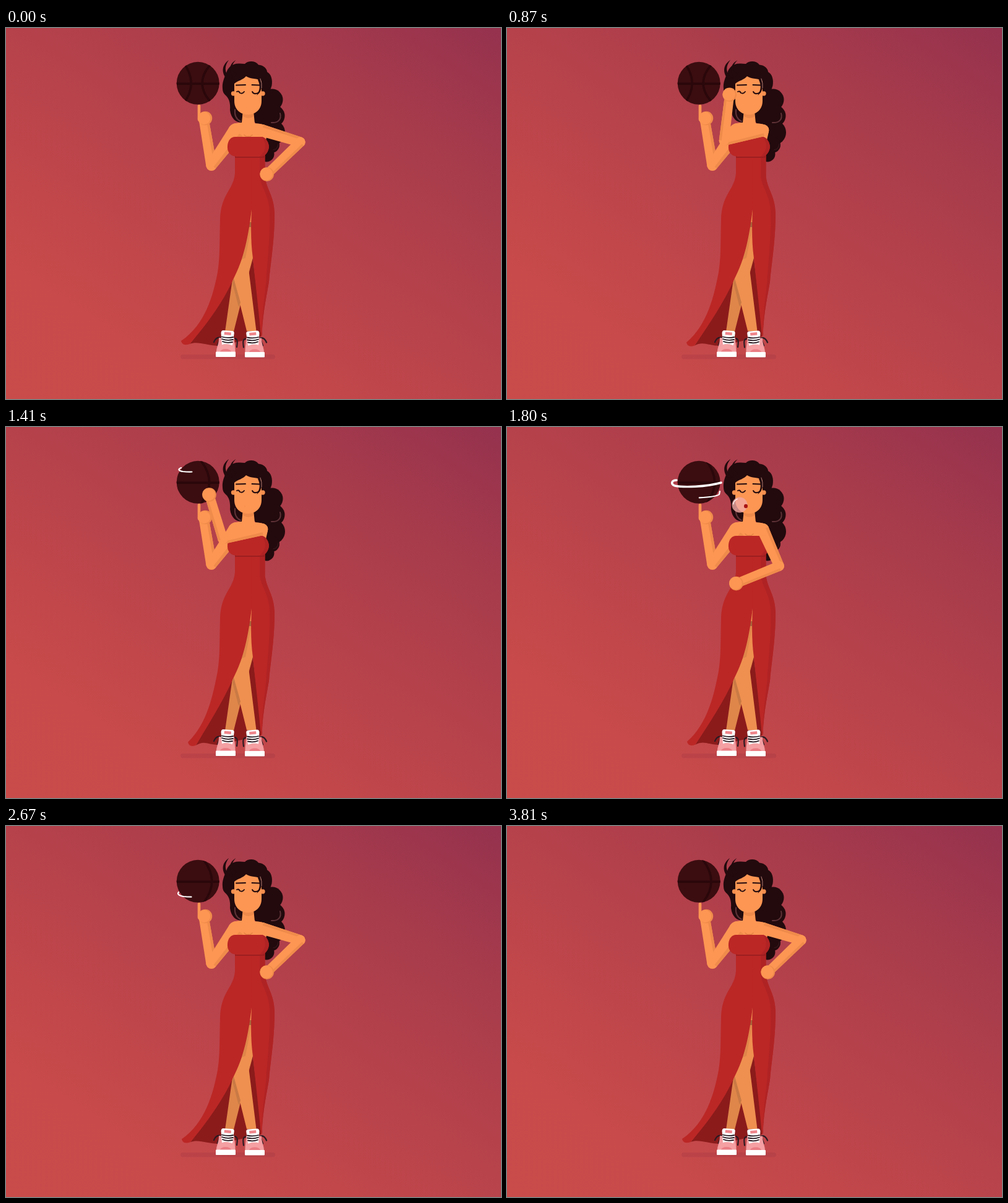
Recreate the animation shown at these times as an HTML page. Size 800 by 600 pixels, loop 3840 ms.

```html
<!DOCTYPE html>
<html lang="en">
<head>
<meta charset="utf-8">
<title>Ball spin</title>
<style>
html, body { margin: 0; width: 100%; height: 100%; overflow: hidden; background: #b8444b; }
svg { display: block; width: 100vw; height: 100vh; }
.line { fill: none; stroke-linecap: round; stroke-linejoin: round; }
</style>
</head>
<body>
<svg viewBox="0 0 800 600" preserveAspectRatio="xMidYMid slice">
  <defs>
    <linearGradient id="bg" gradientUnits="userSpaceOnUse" x1="0" y1="600" x2="516" y2="-179">
      <stop offset="0" stop-color="#c94b4a"/>
      <stop offset=".2" stop-color="#c84a4a"/>
      <stop offset=".5" stop-color="#b8434b"/>
      <stop offset=".76" stop-color="#a83c4b"/>
      <stop offset="1" stop-color="#96324e"/>
    </linearGradient>
    <clipPath id="ballClip"><circle r="34.5"/></clipPath>
    <g id="seams" class="line" stroke="#2a070a" stroke-width="3.600">
      <path d="M-24-34Q2 0-24 34M24-34Q-10 0 24 34"/>
    </g>
    <g id="shoe">
      <path class="line" d="M347 501C341 499 338 503 336 508M346 502L342 513M369 502C375 502 374 509 373 516" stroke="#2b1a22" stroke-width="2.200"/>
      <path d="M340 524C340 516 344 512 344 501H369C369 511 371 516 370.500 524Z" fill="#f39da1"/>
      <path d="M351 489L366 490Q369 490.500 368.700 494L366 513H349L347.500 493Q348 489 351 489Z" fill="#fff"/>
      <path d="M353 491.500L364 492.500 363.500 497 352.500 496Z" fill="#ee858b"/>
      <path class="line" d="M349 499.500Q358 502 367 500M349 503Q357 506 367 504M350 507Q357 510 366 508" stroke="#24161d" stroke-width="1.800"/>
      <path d="M341 524C341 516 346 511 356 511C365 511 370 516 370 524Z" fill="#f5a0a3"/>
      <path d="M346 524A9 5 0 0 1 364 524Z" fill="#ea7d84"/>
      <rect x="339" y="523.500" width="32" height="8.500" rx="1" fill="#fff"/>
    </g>
  </defs>

  <rect width="800" height="600" fill="url(#bg)"/>
  <rect x="282" y="528" width="153" height="7.500" rx="3.700" fill="#8c2f40" opacity=".2"/>

  <g fill="#220a0d">
    <path d="M350 98C349 88 353 80 356 73C358 64 366 56.500 378 57.500L386 58C391 52.500 403 52.500 408 59.500C416 60 422 66 422 71C429 75 431 84 429.500 93L426 104 420 152 384 153C372 154 364 147 362 133C363 120 360 113 354 108Q350 104 350 98Z"/>
    <circle cx="430" cy="116" r="17.500"/>
    <circle cx="433" cy="142" r="17.500"/>
    <circle cx="431" cy="169" r="20"/>
    <circle cx="429" cy="189" r="13"/>
    <circle cx="421" cy="204" r="12.500"/>
    <path d="M402 110H430V205H404Z"/>
  </g>
  <g class="line" stroke="#5e3237" stroke-width="2">
    <path d="M370 132C369 142 373 148 379 151"/>
    <path d="M443 138C446 148 439 154 429 153"/>
    <path d="M440 188Q439 196 432 197" stroke="#35161a" stroke-width="1.500"/>
  </g>

  <path d="M383 134L381 153C366 153 361 158 358 168L360 190H418L423 168C425 159 419 155 402 154L400 134Z" fill="#fd9653"/>
  <path d="M383 134H400V143Q391 149 382.500 142Z" fill="#ee8a4b"/>
  <path class="line" d="M385 173Q389 177 391.500 175Q394 177 398 173" stroke="#e58245" stroke-width="1.600"/>
  <g id="leftArm"></g>

  <path id="inside" fill="#8b1b1b"/>
  <path d="M397 293L388 350 366 406 354 491H368L379 447 399 372 396 320Z" fill="#df864a"/>
  <path d="M397 293L393 314H397ZM397 322L399 370 392.500 393 404.500 490H389L368 405 383 370 390 330Z" fill="#ef9050"/>
  <path d="M391 322H396.500L387 372 381 374Z" fill="#df864a"/>
  <path d="M368 405L379 444 376 451 366 413Z" fill="#c97a45"/>
  <path d="M392.500 314H397V322H391Z" fill="#a9653b"/>
  <path id="dress" fill="#bb2725"/>
  <path d="M397 293C396 315 395 345 399 372C403 410 408 455 412 497Q413 501 413.500 497C415 460 421 435 425 410C428 375 434 345 434 300C433 270 421 262 418.500 240V204H396Z" fill="#bb2725"/>
  <path d="M410 204H418.500V240C421 262 433 270 434 300C434 345 428 375 425 410C421 435 415 460 413.500 497C414 450 420 425 421 400C424 360 427 330 426 295C424 268 412 258 410 240Z" fill="#b02324"/>
  <path d="M370 206H418.500V210H370Z" fill="#9d1e20"/>
  <path d="M370 176H414C421 178 425 186 425 193C423 204 417 208 410 208H372C362 207 357 200 358 190C359 181 364 176 370 176Z" fill="#bb2725"/>
  <path d="M414 176C421 178 425 186 425 193C423 204 417 208 410 208C420 199 422 188 414 176Z" fill="#b02324"/>

  <use href="#shoe"/>
  <use href="#shoe" transform="matrix(-1 0 0 1 757 .5)"/>

  <circle cx="367.500" cy="106" r="3.700" fill="#f58e4e"/>
  <circle cx="415" cy="106" r="3.700" fill="#f58e4e"/>
  <path d="M369 90C375 85 383 84 388 78C395 83 407 81 413 86V118C413 132 403 140 391 140C379 140 369 132 369 118Z" fill="#fd9653"/>
  <g class="line" stroke="#240b0e" stroke-width="1.900">
    <path d="M372 92.500L387 92M397.500 92L410 92.500"/>
    <path d="M373 103Q376 101 378 105Q382 107 385 103M398 103Q400 107 404 106Q408 106 410 102"/>
  </g>
  <path d="M409 80C417 91 413 104 405 109C411 100 411 92 407 84Z" fill="#220a0d"/>
  <path class="line" d="M411 82Q414 89 413 97" stroke="#b78078" stroke-width="1"/>
  <path id="curls" fill="#220a0d" d="M360 52C350 59 347 70 356 82H367C354 77 351 64 360 52ZM371.500 52C362 57 358 68 367 80L374 74C363 72 363 60 371.500 52Z"/>
  <g id="bubble">
    <circle r="1" fill="#f3a9a4" opacity=".8"/>
    <path class="line" d="M-.82-.1A.82.82 0 0 1-.3-.76" stroke="#fff" stroke-width=".1"/>
  </g>
  <ellipse id="mouth" cx="386" cy="128" fill="#a81414"/>

  <g transform="translate(310.200 89.300)">
    <circle r="34.500" fill="#3b0d10"/>
    <g clip-path="url(#ballClip)">
      <use id="seamA" href="#seams"/>
      <use id="seamB" href="#seams"/>
      <path d="M-35 .8H35" stroke="#2a070a" stroke-width="3.600"/>
      <path d="M-20-35A36 36 0 0 0-20 35H-36V-35Z" fill="#200508" opacity=".2"/>
    </g>
  </g>
  <g id="trails" class="line" stroke="#fff" stroke-width="2.200"></g>
  <g id="rightArm"></g>
</svg>
<script>
const LOOP = 3840, STEP = 30, SEAM_GAP = 140;
const SKIN = '#fd9653', SHADE = '#ef8b4b';
const $ = id => document.getElementById(id);
const clamp = (v, a = 0, b = 1) => Math.min(b, Math.max(a, v));
const sine = p => (1 - Math.cos(Math.PI * p)) / 2;
const linear = p => p;

// [time, value] pairs
function track(keys, t, ease = sine) {
  let i = 1;
  while (i < keys.length - 1 && t > keys[i][0]) i++;
  const [t0, a] = keys[i - 1], [t1, b] = keys[i];
  return a + (b - a) * ease(clamp((t - t0) / (t1 - t0)));
}

const UPPER = [[420, 17], [870, 165], [1525, 166], [1975, 17]];
const FORE = [[450, 136], [895, 278], [1080, 242], [1240, 276], [1410, 253], [1480, 250], [1930, 136]];
const HEM = [[0, 0], [400, 1], [630, 5], [870, 7], [1410, 11], [1800, 8], [2670, 1], [3400, 0]];
const TURNS = [[0, 0], [630, -4.5], [870, -6], [1410, -9.79], [1800, -12.74], [2670, -18.76], [3810, -26.78], [3840, -27]];

// Tapered limb with a darker strip; side picks the edge
function limb(x1, y1, r1, x2, y2, r2, side) {
  const d = Math.hypot(x2 - x1, y2 - y1);
  const nx = -(y2 - y1) / d, ny = (x2 - x1) / d;
  const at = (x, y, r) => `${(x + nx * r).toFixed(2)} ${(y + ny * r).toFixed(2)}`;
  const strip = k => `${at(x1, y1, r1 * k)}L${at(x2, y2, r2 * k)}`;
  return `<path fill="${SKIN}" d="M${at(x1, y1, r1)}L${at(x2, y2, r2)}L${at(x2, y2, -r2)}L${at(x1, y1, -r1)}Z"/>` +
    dot(x1, y1, r1) + dot(x2, y2, r2) +
    `<path fill="${SHADE}" d="M${strip(side)}L${at(x2, y2, r2 * side * .5)}L${at(x1, y1, r1 * side * .5)}Z"/>`;
}
const dot = (x, y, r, fill = SKIN) => `<circle cx="${x}" cy="${y}" r="${r}" fill="${fill}"/>`;

$('leftArm').innerHTML =
  limb(332, 222, 8.7, 320, 150, 8, 1) +
  limb(372, 167, 13, 332, 222, 8.7, -1) +
  `<path class="line" d="M312 126V148" stroke="${SKIN}" stroke-width="4.600"/>` +
  dot(322, 146, 11.2, SHADE) + dot(320, 146, 10.2);

const SHOULDER = { x: 413.5, y: 165.5 };

function drawArm(t) {
  const rad = Math.PI / 180;
  const a = track(UPPER, t) * rad, b = track(FORE, t) * rad;
  const ex = SHOULDER.x + 65 * Math.cos(a), ey = SHOULDER.y + 65 * Math.sin(a);
  const hx = ex + 75 * Math.cos(b), hy = ey + 75 * Math.sin(b);
  $('rightArm').innerHTML =
    limb(SHOULDER.x, SHOULDER.y, 9.8, ex, ey, 8, -1) +
    limb(ex, ey, 8, hx, hy, 7.5, -1) +
    dot(hx, hy, 11.3, SHADE) + dot(hx - 1, hy - .6, 10.3);
}

function drawDress(t) {
  const h = track(HEM, t), dy = h * .35;
  const tip = `${283 + h} ${506 + dy}`, fold = `${297 + h * .9} ${511 + dy}`;
  $('dress').setAttribute('d',
    `M370 200V235C368 262 347 268 346 310C345 350 346 370 342 395C335 432 ${322 + h * .3} 480 ${tip}` +
    `Q${285 + h} ${515 + dy} ${fold}C${322 + h * .4} 482 350 445 367 407C385 373 392 335 397 293L412 240V200Z`);
  $('inside').setAttribute('d',
    `M367 405C350 445 ${322 + h * .4} 480 ${fold}C${310 + h} 506 325 514 345 514L412 499L414 495L398 366Z`);
}

function drawBall(t) {
  const turn = track(TURNS, t, linear);
  const x = (turn - Math.floor(turn)) * SEAM_GAP;
  $('seamA').setAttribute('x', x);
  $('seamB').setAttribute('x', x - SEAM_GAP);
}

// Front arcs of a rising helix, low to high; the back halves stay hidden
const ARCS = [
  'M279 107C276 110 280 113 287 114C305 116 338 113 343 109L344 104',
  'M274 86C266 86 264 92 271 95C285 98 322 97 346 90',
  'M283 66C277 68 279 71 286 72C305 74 332 70 336 67C338 65 338 63 335 63'
];
const TRAIL_MS = 240, RISE = 5.1;
const TRAILS = [[423, 0], [628, 0], [1282, 4], [1712, 0], [1917, 0], [2660, 0], [2865, 0], [3480, 0]];

function drawTrails(t) {
  let out = '';
  for (const [start, low] of TRAILS) {
    const p = (t - start) / TRAIL_MS;
    if (p <= 0 || p >= 1) continue;
    const head = RISE * clamp(p / .62), tail = Math.max(low, RISE * clamp((p - .3) / .69));
    ARCS.forEach((d, i) => {
      const a = clamp(tail - 2 * i), b = clamp(head - 2 * i);
      if (b - a < .01) return;
      out += `<path d="${d}" pathLength="1" stroke-dasharray="${b - a} 2" stroke-dashoffset="${-a}"${i === 1 ? ' stroke-width="3.400"' : ''}/>`;
    });
  }
  $('trails').innerHTML = out;
}

function drawFace(t) {
  const open = t < 2350 ? clamp((t - 1400) / 120) : 0;
  $('mouth').setAttribute('rx', 3 * open);
  $('mouth').setAttribute('ry', 3.2 * open);
  const r = t > 1500 && t < 2250 ? Math.min(20, (t - 1500) / 24) : 0;
  $('bubble').setAttribute('transform', `translate(${386 - .8 * r} 126) scale(${r})`);
  const sway = 3 * Math.sin(Math.PI * t / 1280) ** 2;
  $('curls').setAttribute('transform', `rotate(${sway} 365 80)`);
}

function draw(t) {
  drawDress(t);
  drawBall(t);
  drawTrails(t);
  drawFace(t);
  drawArm(t);
}

let begin;
function tick(now) {
  begin ??= now;
  draw(Math.floor(((now - begin) % LOOP) / STEP) * STEP);
  requestAnimationFrame(tick);
}
draw(0);
requestAnimationFrame(tick);
</script>
</body>
</html>
```
